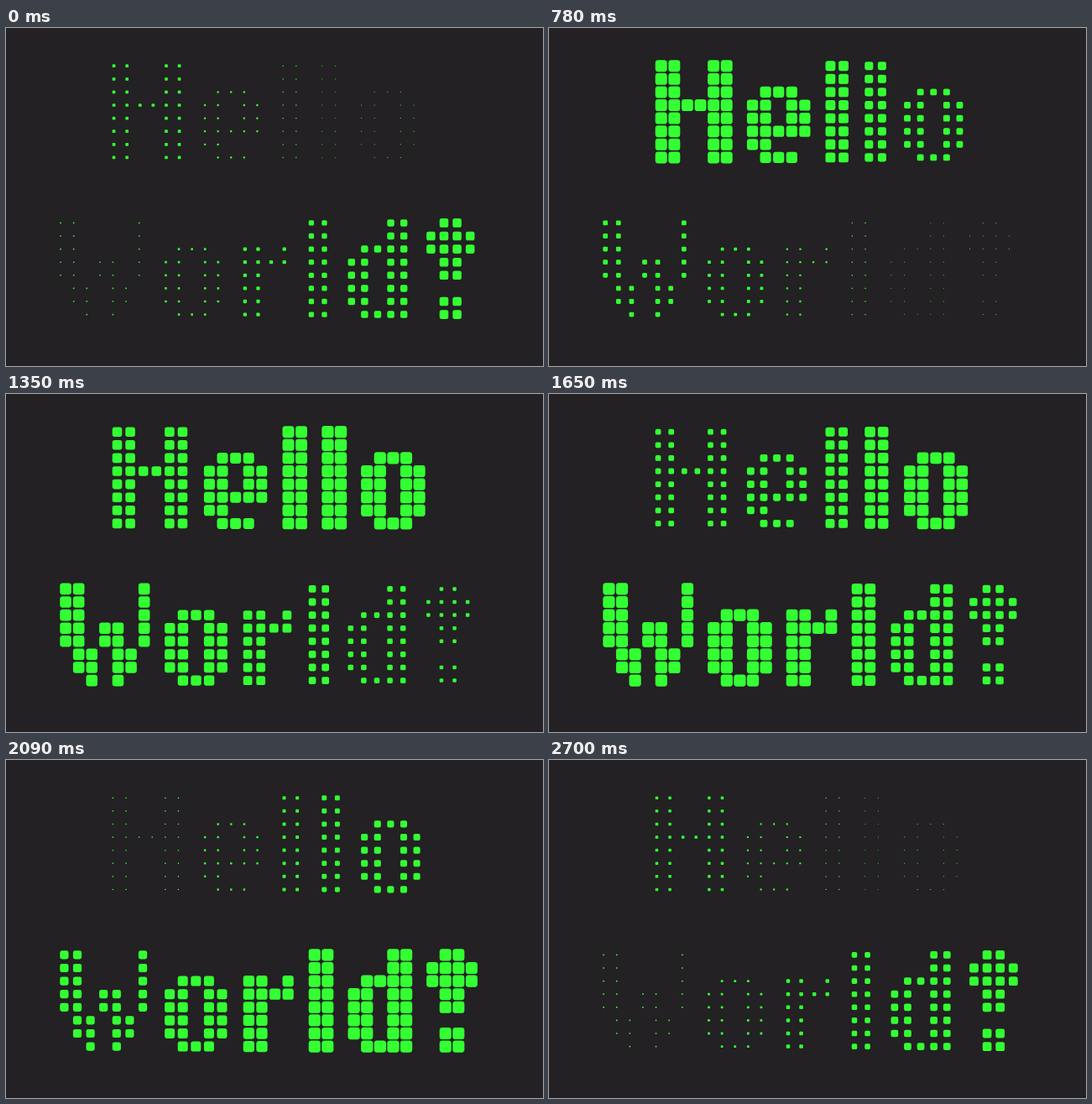
Animation of 640 by 403 pixels, one loop 2750 ms. Source, as an HTML page with a canvas:

```html
<!DOCTYPE html>
<html lang="en">
<head>
<meta charset="utf-8">
<title>Hello World!</title>
<style>
html, body { margin: 0; width: 100%; height: 100%; overflow: hidden; background: #232123; }
canvas { display: block; width: 640px; height: 403px; }
</style>
</head>
<body>
<canvas id="stage" width="640" height="403"></canvas>
<script>
const ctx = document.getElementById('stage').getContext('2d');

const LOOP = 2750;
const PULSE = 2710;
const FPS = 23;
const PITCH = 15.6;
const LEFT = 64.3;
const TOP = 45.2;
const MIN_SIZE = 0.9;
const MAX_SIZE = 14.3;
const FIRST_PEAK = 925;
const STAGGER = 129;

const times = (n, row) => Array(n).fill(row);
const bowl = ['', '', '.###', ...times(4, '##.##'), '.###'];
const bar = times(8, '##');

const glyphs = {
  H: [...times(3, '##..##'), '######', ...times(4, '##..##')],
  e: ['', '', '.###', '##.##', '##.##', '#####', '##', '.###'],
  l: bar,
  o: bowl,
  W: [...times(3, '##....#'), ...times(2, '##.##.#'), ...times(2, '.##.##'), '..#.#'],
  r: ['', '', '##.#', '####', ...times(4, '##')],
  d: ['...##', '...##', '.####', ...times(4, '##.##'), '.####'],
  '!': ['.##', '####', '####', '.##', '.##', '', '.##', '.##']
};

// Lines of text on one shared grid: start column and start row.
const lines = [
  { text: 'Hello', col: 4, row: 0 },
  { text: 'World!', col: 0, row: 12 }
];

const letters = [];
for (const { text, col, row } of lines) {
  let x = col;
  for (const char of text) {
    const rows = glyphs[char];
    letters.push({ rows, col: x, row, peak: FIRST_PEAK + letters.length * STAGGER });
    x += Math.max(...rows.map(r => r.length)) + 1;
  }
}

// cubic-bezier(.42, 0, .58, 1)
function easeInOut(x) {
  let u = x;
  for (let i = 0; i < 5; i++) {
    const error = u * (1.26 + u * (0.52 * u - 0.78)) - x;
    u -= error / (1.26 - 1.56 * u + 1.56 * u * u);
  }
  return u * u * (3 - 2 * u);
}

function cellSize(time, peak) {
  const phase = ((time - peak) / PULSE + 2) % 1;
  return MIN_SIZE + (MAX_SIZE - MIN_SIZE) * easeInOut(Math.abs(1 - 2 * phase));
}

// Cells grow rightwards from their left edge and evenly up and down.
function drawLetter({ rows, col, row, peak }, time) {
  const size = cellSize(time, peak);
  ctx.beginPath();
  rows.forEach((cells, r) => [...cells].forEach((cell, c) => {
    if (cell !== '#') return;
    const x = LEFT + (col + c) * PITCH;
    const y = TOP + (row + r) * PITCH - size / 2;
    ctx.roundRect(x, y, size, size, size * 0.24);
  }));
  ctx.fill();
}

function draw() {
  const now = performance.now() % LOOP;
  const time = Math.floor((now + 5) * FPS / 1000) * 1000 / FPS;
  ctx.fillStyle = '#232123';
  ctx.fillRect(0, 0, 640, 403);
  ctx.fillStyle = '#33ff33';
  for (const letter of letters) drawLetter(letter, time);
  requestAnimationFrame(draw);
}
draw();
</script>
</body>
</html>
```
